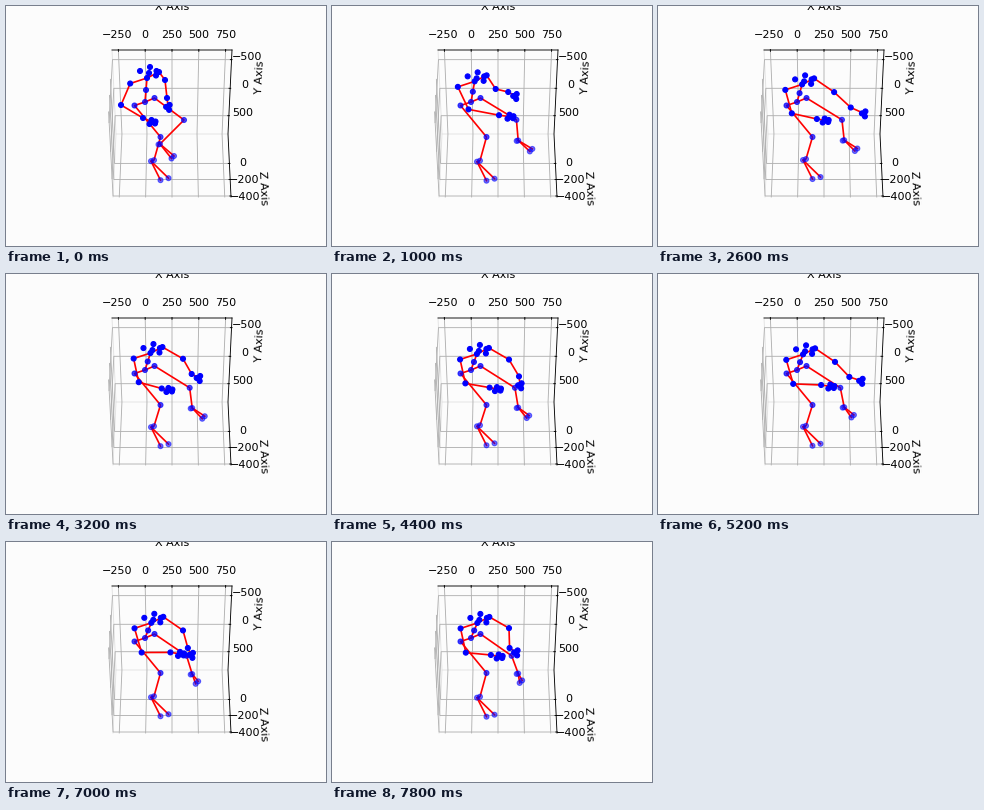
These frames come from a looping animation (320 px wide and 240 px high, 8000 ms). A matplotlib script:

```python
import numpy as np
import matplotlib.pyplot as plt
from matplotlib.animation import FuncAnimation

W, H, DPI = 320, 240, 80
STEP, FRAMES = 200, 40
PAPER, GRID, RIM = "#fcfcfc", "#b0b0b0", "#e2e2e2"

fig = plt.figure(figsize=(W / DPI, H / DPI), dpi=DPI, facecolor=PAPER)
ax = fig.add_axes([0, 0, 1, 1])
ax.set(xlim=(0, W), ylim=(H, 0))
ax.axis("off")


# ---- perspective box: u runs right, v down the back, t towards the viewer ----
def corner(x, y, width):
    return np.array([x, y, 1]) / width


TOP, BEND, FRONT = corner(106, 44, 120), corner(110, 128, 112), corner(107, 191, 118)


def project(u, v, t):
    x, y, w = TOP + v * (BEND - TOP) + t * (FRONT - BEND)
    return (x + u) / w, y / w


def edge(*pts, color=GRID, z=1):
    xs, ys = zip(*(project(*p) for p in pts))
    ax.plot(xs, ys, color=color, lw=0.8, zorder=z, snap=False)


def tick(a, b):
    edge(a, b, color="black", z=2)


edge((0, 0, 0), (0, 1, 0), (0, 1, 1), color=RIM, z=0)
edge((0, 1, 0), (1, 1, 0), color=RIM, z=0)
for u in 0.053 + 0.2235 * np.arange(5):
    edge((u, 0, 0), (u, 1, 0), (u, 1, 1))
    tick((u, -0.006, 0), (u, 0.015, 0))
for v in 0.108 + 0.331 * np.arange(3):
    edge((0, v, 1), (0, v, 0), (1, v, 0))
    tick((0.99, v, 0), (1.005, v, 0))
for t in 0.48 + 0.2525 * np.arange(3):
    edge((0, 0, t), (0, 1, t), (1, 1, t))
    tick((0.99, 1, t), (1.005, 1, t))
edge((0, 0, 0), (1, 0, 0), color="black", z=2)
edge((1, 0, 0), (1, 1, 0), (1, 1, 1), color="black", z=2)


def label(x, y, text, angle=0):
    ax.text(x, y, text, fontsize=10, ha="center", va="center", rotation=angle,
            family="DejaVu Sans", zorder=3)


def signed(n):
    return str(n).replace("-", "−")


for i in range(5):
    label(111.5 + 27.1 * i, 29, signed(250 * i - 250))
for i in range(3):
    label(241 - 2 * i, 51.3 + 28 * i, signed(500 * i - 500))
    label(237 + i, 157 + 17 * i, signed(-200 * i))
label(166, 0.6, "X Axis")
label(254, 71, "Y Axis", 87)
label(256.5, 181.5, "Z Axis", -87)


# ---- body ----
def smooth(x):
    x = np.clip(x, 0, 1)
    return x * x * (3 - 2 * x)


def wave(s, peak, period):
    return np.cos(2 * np.pi * (s - peak) / period)


def pt(x, y):
    return np.array([x, y], float)


# points carried along by a joint
FOLLOW = {
    "nose": [(-9, -2), (1, -6), (7.5, -2), (7, 2.5)],
    "l_hand": [(-3, 2), (-1, -2), (3, -0.5), (2.5, 1.5)],
    "r_hand": [(1.5, -2), (-2, 0), (1, 3)],
    "l_ank": [(-3, 1)],
    "l_toe": [(8, -2)],
    "r_ank": [(-1.5, 0.5)],
    "r_toe": [(-2.5, 2.5)],
}
CHAINS = [c.split() for c in (
    "hip spine neck nose", "neck l_sho l_elb l_wri l_hand",
    "neck r_sho r_elb r_wri r_hand", "hip l_hip l_knee l_ank l_ank0 l_toe",
    "l_ank0 l_toe0", "hip r_hip r_knee r_ank r_toe", "r_ank r_toe0")]


def pose(s):
    """Joint positions after s seconds."""
    settle = 1 - np.exp(-s / 2.2)
    turn = smooth(s)
    age = s * s
    reach = wave(s, 1, 5.2)
    flick = wave(s, 1, 2.2)
    bob = pt(0, 1.7 * wave(s, 0.9, 6.9))
    swing = sum(np.exp(-((s - c) / 0.25) ** 2) for c in (2.55, 5.4))

    def unfold(start, end):
        return start + turn * (end - start)

    p = {"hip": pt(139, 96), "l_hip": pt(128.5, 99.5), "r_hip": pt(148.5, 92)}

    # torso and head sink slowly
    p["neck"] = pt(141 + 4.5 * settle, 72 + 9.2 * settle)
    p["spine"] = (p["hip"] + p["neck"]) / 2
    p["nose"] = p["neck"] + pt(2, -3 - 2 * (1 - turn))
    p["l_sho"] = p["neck"] + pt(-16.8, 5.5)
    p["r_sho"] = p["neck"] + pt(12, -6)

    # left arm swings across and then sways
    p["l_elb"] = unfold(pt(115, 99), pt(134.5 + 2 * reach, 99 + 12 * settle))
    p["l_wri"] = unfold(pt(137, 112), pt(161 + 6 * reach, 112 - 2.8 * reach))
    p["l_hand"] = p["l_wri"] + unfold(pt(9.5, 4), pt(9.5 + 2 * reach, 1.5))

    # right arm lifts outwards and waves
    p["r_elb"] = pt(159 + 18 * smooth(s / 3),
                    74 + 13 * smooth(s / 2) + 2.5 * turn * reach)
    p["r_wri"] = pt(161 + 26 * np.sqrt(np.sin(np.pi * s / 9)) + 9 * swing,
                    np.interp(s, [0, 1, 1.8, 3.2, 6.2], [92, 86, 108, 100, 106]) - 2 * swing)
    p["r_hand"] = p["r_wri"] + pt(4 + 3 * flick + 10 * swing, 6.5 - 2.5 * flick - swing)

    # left leg stands, right leg steps out and drifts back
    p["l_knee"] = pt(154.5, 131)
    p["l_ank"] = pt(148, 153) + bob
    p["l_toe"] = pt(154.5, 173) + bob
    p["r_knee"] = unfold(pt(178, 114), pt(184.5 - 0.08 * age, 113.8))
    p["r_ank"] = unfold(pt(154, 138), pt(186.2, 134.5 - 0.05 * age))
    p["r_toe"] = unfold(pt(168, 150), pt(200.5 - 0.17 * age, 143 - 0.075 * age))

    for joint, offsets in FOLLOW.items():
        for n, d in enumerate(offsets):
            p[f"{joint}{n}"] = p[joint] + d
    return p


def alpha(joint):
    """Joints farther down the body lie deeper and look paler."""
    for part, a in (("spine", 0.85), ("hip", 0.75), ("knee", 0.7), ("ank", 0.55), ("toe", 0.55)):
        if part in joint:
            return a
    return 1


start = pose(0)
bones = [ax.plot([], [], color="red", lw=1.5, zorder=4)[0] for _ in CHAINS]
dots = ax.scatter(*np.array(list(start.values())).T, s=20, linewidths=1, zorder=5,
                  c=[(0, 0, 1, alpha(k)) for k in start])


def draw(frame):
    p = pose(frame * STEP / 1000)
    for bone, chain in zip(bones, CHAINS):
        bone.set_data(*np.array([p[k] for k in chain]).T)
    dots.set_offsets(list(p.values()))
    return [*bones, dots]


anim = FuncAnimation(fig, draw, frames=FRAMES, interval=STEP, init_func=lambda: draw(0),
                     repeat=True, repeat_delay=0, blit=False)
plt.show()
```
